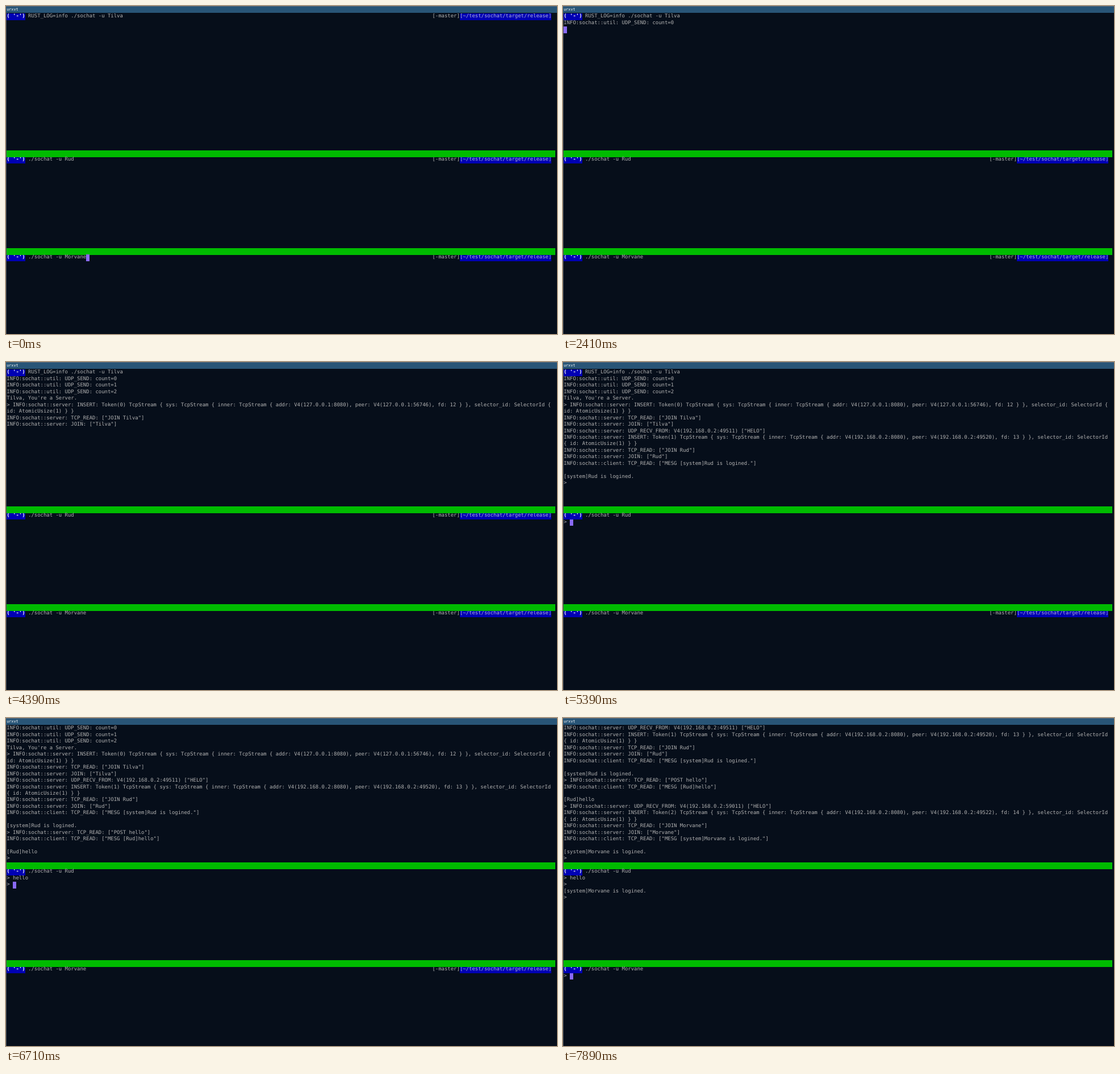
Recreate the animation shown at these times as an HTML page. Size 970x577 px, loop 8000 ms.

```html
<!DOCTYPE html>
<html lang="en">
<head>
<meta charset="utf-8">
<title>Terminal chat</title>
<style>
  html, body { margin: 0; width: 100%; height: 100%; overflow: hidden; background: #060e1a; }
  #stage {
    position: relative; width: 970px; height: 577px; overflow: hidden;
    background: #060e1a; color: #b2b2b2;
    font: 8.951px/11.451px "DejaVu Sans Mono", monospace;
    text-rendering: geometricPrecision; font-kerning: none; font-variant-ligatures: none;
  }
  #stage div { position: absolute; white-space: pre; }
  #title {
    left: 0; top: 0; width: 970px; height: 12px; box-sizing: border-box;
    padding-left: 1.3px; border-top: 1px solid #5e6b78;
    background: #285577; color: #fff; font-size: 6.71px; line-height: 10px;
  }
  #edge { left: 0; top: 12px; width: 1px; height: 565px; background: #4a4f57; }
  .bar { left: 1px; width: 966px; height: 12px; background: #00bb00; }
  .row { left: 1.347px; height: 11.451px; }
  .mark { height: 11.451px; background: #0000b4; }
  .face { color: #fff; font-weight: bold; }
  .path { color: #b0b0dc; }
  #cursor { width: 5.389px; height: 11.451px; background: #8a6af6; }
</style>
</head>
<body>
<div id="stage">
  <div id="title">urxvt</div>
  <div id="edge"></div>
</div>
<script>
const COL = 5.389, ROW = 11.451, LEFT = 1.347, TOP = 13.47;
const COLS = 179, HOST_ROWS = 21, GUEST_ROW = 22, THIRD_ROW = 37, LOOP = 8000;
const [HOST, GUEST, THIRD] = ['Tilva', 'Rud', 'Morvane'];

const stage = document.getElementById('stage');
const x = col => LEFT + col * COL + 'px';
const y = row => TOP + row * ROW + 'px';

function add(cls, row, col, text = '') {
  const el = document.createElement('div');
  el.className = cls;
  el.style.top = y(row);
  if (col !== undefined) el.style.left = x(col);
  el.textContent = text;
  return stage.appendChild(el);
}

// Log text
const info = (part, text) => `INFO:sochat::${part}: ${text}`;
const send = n => info('util', `UDP_SEND: count=${n}`);
const read = (part, text) => info(part, `TCP_READ: ["${text}"]`);
const hello = port => info('server', `UDP_RECV_FROM: V4(192.168.0.2:${port}) ["HELO"]`);
const insert = (id, ip, port) => info('server',
  `INSERT: Token(${id}) TcpStream { sys: TcpStream { inner: TcpStream { ` +
  `addr: V4(${ip}:8080), peer: V4(${ip}:${port}), fd: ${12 + id} } }, ` +
  'selector_id: SelectorId { id: AtomicUsize(1) } }');
const join = name => [read('server', 'JOIN ' + name), info('server', `JOIN: ["${name}"]`)];
const message = text => [read('client', 'MESG ' + text), '', text];
const logined = name => `[system]${name} is logined.`;
const wrap = line => line.length > COLS ? [line.slice(0, COLS), line.slice(COLS)] : [line];

const command = (name, env = '') => `       ${env}./sochat -u ${name}`;
const log = [
  command(HOST, 'RUST_LOG=info '), send(0), send(1), send(2),
  `${HOST}, You're a Server.`,
  '> ' + insert(0, '127.0.0.1', 56746), ...join(HOST),
  hello(49511), insert(1, '192.168.0.2', 49520), ...join(GUEST), ...message(logined(GUEST)),
  '> ' + read('server', 'POST hello'), ...message(`[${GUEST}]hello`),
  '> ' + hello(59011), insert(2, '192.168.0.2', 49522), ...join(THIRD), ...message(logined(THIRD))
].flatMap(wrap);

// Start time, log lines, trailing prompt, panes waiting, guest lines, third lines, cursor [row, col]
const ALL = 'hgt';
const typed = n => ['> ' + 'hello'.slice(0, n)];
const steps = [
  [0, 1, 0, ALL, [], [], [37, 26]],
  [600, 1, 0, ALL, [], [], [0, 38]],
  [1320, 1, 0, 'gt', [], [], [1, 0]],
  [1820, 1, 0, 'gt', [], []],
  [2340, 1, 0, 'gt', [], [], [1, 0]],
  [2410, 2, 0, 'gt', [], [], [2, 0]],
  [3330, 2, 0, 'gt', [], []],
  [3410, 3, 0, 'gt', [], []],
  [3820, 3, 0, 'gt', [], [], [3, 0]],
  [4320, 3, 0, 'gt', [], []],
  [4390, 9, 0, 'gt', [], []],
  [4680, 9, 0, 'gt', [], [], [9, 0]],
  [4870, 9, 0, 'gt', [], [], [22, 22]],
  [5320, 9, 0, 't', [], [], [23, 0]],
  [5390, 17, 1, 't', typed(0), [], [23, 2]],
  [5790, 17, 1, 't', typed(0), []],
  ...[6020, 6110, 6210, 6350, 6490].map((t, i) =>
    [t, 17, 1, 't', typed(i + 1), [], [23, 3 + i]]),
  [6710, 21, 1, 't', ['> hello', '>'], [], [24, 2]],
  [7220, 21, 1, 't', ['> hello', '>'], [], [37, 26]],
  [7820, 21, 1, '', ['> hello', '>'], [], [38, 0]],
  [7890, 29, 1, '', ['> hello', '>', logined(THIRD), '>'], ['>'], [38, 2]]
];

// Fixed and reusable parts
const prompts = [0, GUEST_ROW, THIRD_ROW].map((row, i) => {
  const face = add('mark face', row, 0, "( '-')");
  const branch = add('row', row, 139, '[-master]');
  const path = add('mark path', row, 148, '[~/test/sochat/target/release]');
  return { key: ALL[i], face, right: [branch, path] };
});
[21, 36].forEach(row => add('bar', row));
const rows = Array.from({ length: 42 }, (_, i) => add('row', i, 0));
const cursor = add('', 0, 0);
cursor.id = 'cursor';

const show = (el, on) => { el.style.visibility = on ? 'visible' : 'hidden'; };

function draw([, count, tail, waiting, guest, third, at]) {
  const text = log.slice(0, count).concat(tail ? '>' : []).slice(-HOST_ROWS);
  const put = (start, lines) => lines.forEach((line, i) => { text[start + i] = line; });
  put(GUEST_ROW, [command(GUEST), ...guest]);
  put(THIRD_ROW, [command(THIRD), ...third]);
  rows.forEach((el, i) => { el.textContent = text[i] || ''; });
  prompts.forEach(p => p.right.forEach(el => show(el, waiting.includes(p.key))));
  show(prompts[0].face, text[0] === log[0]);
  show(cursor, at);
  if (at) {
    cursor.style.top = y(at[0]);
    cursor.style.left = x(at[1]);
  }
}

let current;
const begin = performance.now();
function tick() {
  const t = (performance.now() - begin) % LOOP;
  const step = steps.findLast(s => s[0] <= t);
  if (step !== current) draw(current = step);
  requestAnimationFrame(tick);
}
tick();
</script>
</body>
</html>
```
